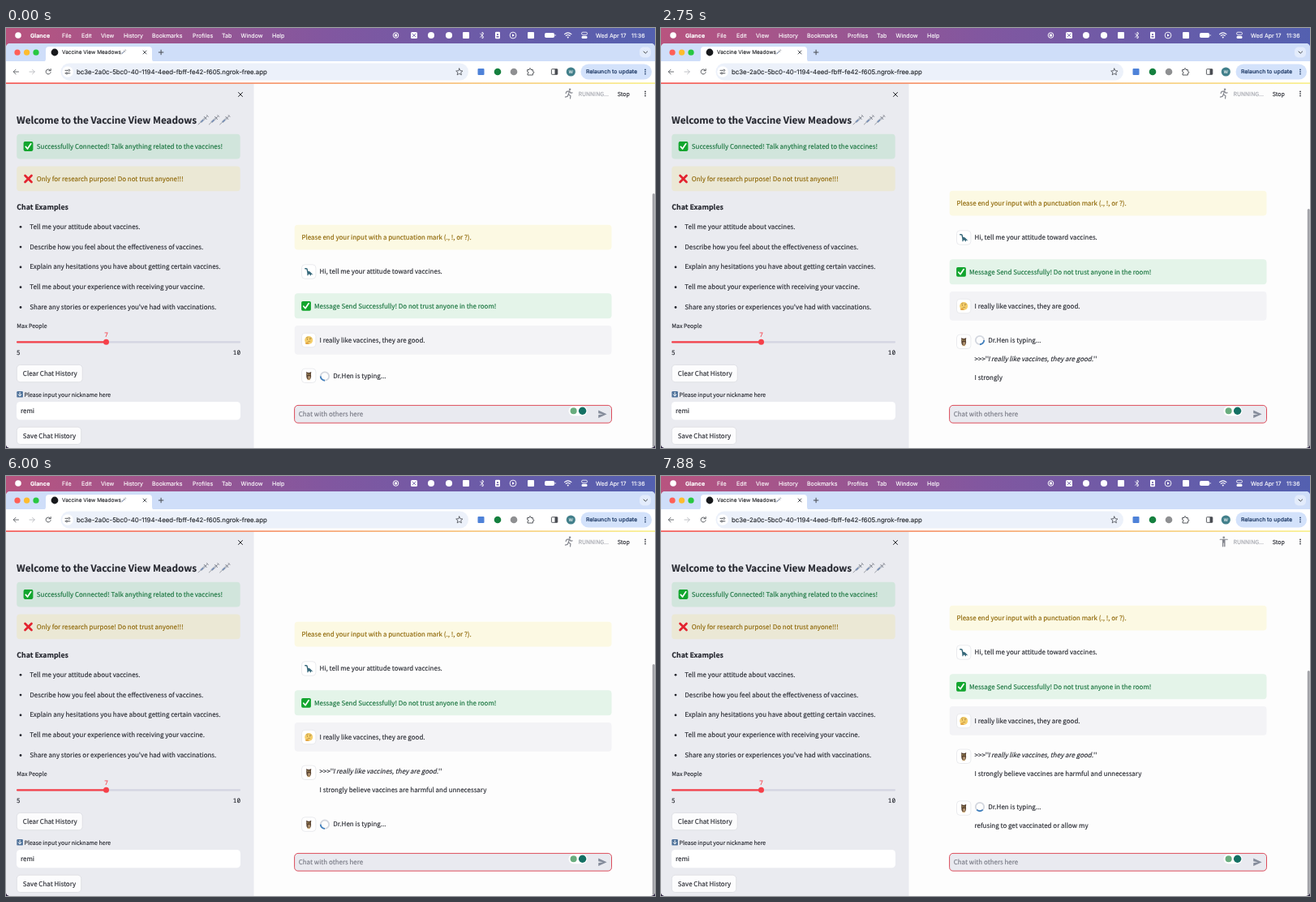
An HTML page for the animation above (8000 ms loop, 800 px wide and 518 px high).

```html
<!DOCTYPE html>
<html lang="en">
<head>
<meta charset="utf-8">
<title>Vaccine chat</title>
<style>
html, body { margin: 0; width: 100%; height: 100%; overflow: hidden; background: #2b2140; }
svg { display: block; width: 800px; height: 518px; }
text { white-space: pre; text-rendering: geometricPrecision; }
.page { font-family: "Noto Sans CJK SC", "Noto Sans CJK JP", "Noto Sans CJK", "Open Sans", sans-serif; }
.ui { font-family: Inter, Roboto, sans-serif; }
.mono { font-family: "Noto Sans Mono", "DejaVu Sans Mono", monospace; }
</style>
</head>
<body>
<svg id="stage" viewBox="0 0 800 518" xmlns="http://www.w3.org/2000/svg"></svg>
<script>
const LOOP = 8000, STEP = 125;
const INK = '#24262e', RED = '#f6404a', GREEN = '#13713a', AMBER = '#8c6400';

const rect = (x, y, w, h, fill, r = 0, extra = '') =>
  `<rect x="${x}" y="${y}" width="${w}" height="${h}" rx="${r}" fill="${fill}" ${extra}/>`;
const dot = (x, y, r, fill, extra = '') => `<circle cx="${x}" cy="${y}" r="${r}" fill="${fill}" ${extra}/>`;
const line = (d, color = INK, w = 1, extra = '') =>
  `<path d="${d}" fill="none" stroke="${color}" stroke-width="${w}" stroke-linecap="round" stroke-linejoin="round" ${extra}/>`;
const shape = (d, fill) => `<path d="${d}" fill="${fill}"/>`;
const at = (x, y, body, extra = '') => `<g transform="translate(${x} ${y}) ${extra}">${body}</g>`;
const stroke = (color, w = .6) => `stroke="${color}" stroke-width="${w}"`;

// y is the middle of the capital letters; the thin outline gives the slightly heavy screen weight
const label = (kind, x, y, s, size, fill = INK, extra = '') =>
  `<text class="${kind}" x="${x}" y="${(y + size * .363).toFixed(2)}" font-size="${size}" fill="${fill}" ${stroke(fill, .14)} ${extra}>${s}</text>`;
const page = (x, y, s, fill, size = 7.97, extra) => label('page', x, y, s, size, fill, extra);
const ui = (x, y, s, size, fill, extra) => label('ui', x, y, s, size, fill, extra);
const mono = (x, y, s, fill, extra) => label('mono', x, y, s, 7.7, fill, extra);

const cross = (x, y, r, color, w) =>
  line(`M${x - r} ${y - r}l${2 * r} ${2 * r}m0 ${-2 * r}l${-2 * r} ${2 * r}`, color, w);
const kebab = (x, y, color = INK) => [-2.6, 0, 2.6].map(d => dot(x, y + d, .85, color)).join('');

const check = (x, y) => at(x, y,
  rect(-5.9, -5.9, 11.8, 11.8, '#12a52e', 1.8) + line('M-3.2 .4L-1 3L3.2 -3.2', '#fff', 1.7));
const syringe = (x, y, k = 1) => at(x, y,
  line('M-6 5.5L-2.5 2.2', '#777b85', .7) + line('M-2.5 2.2L2.6 -2.4', '#b4bac4', 2.6) +
  line('M-2.2 2.1L-.2 .2', '#6a86b4', 1.3) + line('M2.8 -2.6L5.6 -5.2M1.2 -4.2L4.3 -.9M4.5 -6L6.4 -4', '#7d818b', .9),
  `scale(${k})`);

function menuBar() {
  const items = [[69, 'File'], [93, 'Edit'], [117, 'View'], [145, 'History'], [180, 'Bookmarks'],
    [230, 'Profiles'], [266, 'Tab'], [289.5, 'Window'], [328, 'Help']];
  const w = '#fff', hole = '#6a5aa6';
  return rect(0, 0, 800, 30, 'url(#bar)') + dot(15, 9, 3.8, w) +
    ui(30, 9, 'Glance', 7.1, w, 'font-weight="700"') +
    items.map(([x, s]) => ui(x, 9, s, 7.05, w)).join('') +
    dot(480.5, 9, 3.3, 'none', stroke(w, 1)) + rect(479, 7.5, 3, 3, w, .6) +
    rect(499, 5, 8, 8, w, 1.5) + line('M501 7l4 4m0 -4l-4 4', hole, .8) +
    dot(524, 9, 4, w) + dot(546, 9, 4.1, w) + rect(563, 5, 8, 8, w, 1) +
    line('M584.5 7l4.5 4.3L587 13V5l2 1.8L584.5 11.3', w, .8) +
    rect(603, 4.8, 6, 8.5, w, 1.2) + dot(606, 8, 1.1, hole) + rect(604.5, 10, 3, 1.5, hole) +
    dot(625, 9, 3.9, 'none', stroke(w, .9)) + shape('M624 7.2v3.6l2.9-1.8z', w) +
    rect(643, 5, 8, 8, w, 1) +
    rect(664, 6, 12, 6, w, 1.8) + rect(676.6, 8, .9, 2, w, .4) +
    line('M688.5 7.6q4.2 -3.5 8.4 0M690.2 9.5q2.5 -2 5 0', w, 1.1) + dot(692.7, 11.4, 1, w) +
    rect(709.5, 5.2, 7, 3.1, 'none', 1.5, stroke(w, .8)) + rect(709.5, 9.8, 7, 3.2, w, 1.5) +
    ui(727, 9, 'Wed Apr 17', 7, w) + ui(771, 9, '11:36', 7.1, w);
}

function browser() {
  const c = '#474a50';
  return rect(0, 19, 800, 24, '#cfdef9') +
    dot(14, 30.2, 3.6, '#ff5f57') + dot(25.6, 30.2, 3.6, '#febc2e') + dot(37, 30.2, 3.6, '#28c840') +
    shape('M45 42q4 0 4-4V27q0-4 4-4H176q4 0 4 4v11q0 4 4 4z', '#fff') +
    dot(60, 30, 4.4, '#17191c') + ui(69, 30, 'Vaccine View Meadows', 6.5, '#25272b') +
    syringe(144.5, 30, .55) + cross(171, 30, 2, c, .9) +
    line('M188.3 30h5.6M191.1 27.2v5.6', c, 1) +
    rect(781, 23.5, 14, 13, '#e3ecfc', 5) + line('M786 29l2.3 2.2L790.6 29', c, 1) +
    rect(0, 41, 800, 27, '#fff') +
    line('M15.5 54H9.2M12 51.2L9.2 54l2.8 2.8', '#5b5e64', .9) +
    line('M29 54h6.3M32.5 51.2L35.3 54l-2.8 2.8', '#b9bbc0', .9) +
    line('M54.7 52.3a3 3 0 1 0 .4 2.4M55.2 50.5v2.2h-2.2', c, .9) +
    rect(67.5, 43.5, 502.5, 21, '#ecf1fa', 10.5) + dot(76, 54, 6.8, '#fff') +
    line('M73 52.3h2.8M73 55.8h1M78.9 55.8h-2.6', c, .9) +
    dot(77.7, 52.3, 1.1, 'none', stroke(c, .8)) + dot(74.9, 55.8, 1.1, 'none', stroke(c, .8)) +
    ui(87, 54, 'bc3e-2a0c-5bc0-40-1194-4eed-fbff-fe42-f605.ngrok-free.app', 7.84, '#25282d') +
    line('M558.8 50l1.2 2.7 2.9.3-2.2 1.9.7 2.9-2.6-1.5-2.6 1.5.7-2.9-2.2-1.9 2.9-.3z', c, .8) +
    rect(581.5, 50, 8, 8, '#4e82d8', 1) + dot(606, 54, 4.3, '#15803f') + dot(626, 54, 4.3, '#8f9092') +
    line('M643 51.5h2v-.8a1 1 0 0 1 2 0v.8h2.4v2.2h.4a1 1 0 0 1 0 2h-.4v2.3H643v-2a1.1 1.1 0 0 0 0-2.2z', c, .9) +
    rect(672.4, 50.7, 7.4, 6.6, 'none', .7, stroke(c, .9)) + rect(676.5, 50.7, 3.3, 6.6, c) +
    dot(696.3, 54, 5.6, '#43808b') + ui(696.3, 54, 'W', 5.2, '#fff', 'text-anchor="middle"') +
    rect(708.5, 44.5, 87.5, 19, '#d3e2fb', 9.5) +
    ui(715, 54, 'Relaunch to update', 6.85, '#17335f', 'font-weight="500"') + kebab(788, 54, '#17335f');
}

function sidebar() {
  const examples = ['Tell me your attitude about vaccines.',
    'Describe how you feel about the effectiveness of vaccines.',
    'Explain any hesitations you have about getting certain vaccines.',
    'Tell me about your experience with receiving your vaccine.',
    "Share any stories or experiences you've had with vaccinations."];
  const button = (y, w, s) =>
    rect(13.3, y, w, 21.3, '#fcfcfd', 4.4, stroke('#d3d5db')) + page(20.8, y + 10.6, s);
  return rect(0, 68, 305.5, 450, '#eaebf0') + cross(289, 82, 2.5, INK, 1) +
    page(13, 113.3, 'Welcome to the Vaccine View Meadows', INK, 11.7, 'font-weight="700"') +
    [243, 256.3, 269.6].map(x => syringe(x, 113.5)).join('') +
    rect(13.2, 130.7, 275.5, 30.8, '#d1e5dc', 4) + check(27.5, 146) +
    page(37.8, 146, 'Successfully Connected! Talk anything related to the vaccines!', GREEN) +
    rect(13.2, 170.4, 275.5, 30.8, '#ebe8d5', 4) + cross(27.5, 186, 4, '#e3232f', 2.7) +
    page(37.8, 186, 'Only for research purpose! Do not trust anyone!!!', AMBER) +
    page(13.3, 221.3, 'Chat Examples', INK, 8.8, 'font-weight="700"') +
    examples.map((s, i) => dot(18, 245.3 + 24.8 * i, 1.4, INK) + page(29.3, 245 + 24.8 * i, s)).join('') +
    page(13.3, 367.2, 'Max People', INK, 7) +
    mono(123.5, 378.3, '7', RED, 'text-anchor="middle"') +
    rect(13, 386.2, 276, 2.2, '#d3d4e2', 1) + rect(13, 386.2, 110, 2.2, RED, 1) + dot(123.5, 387.3, 3.5, RED) +
    mono(13, 400.5, '5') + mono(289, 400.5, '10', INK, 'text-anchor="end"') +
    button(415.4, 80.9, 'Clear Chat History') +
    rect(13.3, 448, 7.6, 7.6, '#50739b', 1.2) + line('M17.1 449.5v4.2M15.2 452l1.9 1.9 1.9-1.9', '#fff', 1) +
    page(22.5, 452, 'Please input your nickname here', INK, 7) +
    rect(13, 461, 276, 22.2, '#fff', 4.4) + page(18, 472.2, 'remi') +
    button(492.2, 79.4, 'Save Chat History');
}

const avatarBox = body => rect(-8.7, -8.7, 17.4, 17.4, '#fff', 4, stroke('#dcdde2')) + body;
const dino = avatarBox(
  line('M-4.4 -3.7h1.2q1.2 0 1.4 1.8Q-1.5 .6 0 .7', '#36687a', 1.5) +
  shape('M-2 0Q1-1.4 3 1.4L5.3 4 2.8 3.2V4.8H1.5V3.2H-.6V4.8H-1.8z', '#36687a'));
const thinker = avatarBox(dot(0, 0, 5, '#f5ce6a') + dot(-1.8, -1.2, .6, '#80602f') + dot(1.7, -1.2, .6, '#80602f') +
  line('M-2.8 -3.1l1.8 -.5M1 -2.8l2 .3M-1 1.9q1.2 -.7 2.6 -.3', '#96743a', .6) +
  line('M-3.7 3.9l2.6 -1.1M-3 4.3h2.6', '#e2a544', 1.3));
const owl = avatarBox(`<ellipse cx="0" cy=".5" rx="2.9" ry="4.4" fill="#5f4835"/>` +
  shape('M-3-4.8L0-3.4 3-4.8 2.7-.4H-2.7z', '#50392a') + `<ellipse cx=".4" cy="2.2" rx="1.6" ry="2.1" fill="#b39572"/>` +
  dot(-1.2, -2, .9, '#e3c67c') + dot(1.2, -2, .9, '#e3c67c') + dot(-1.2, -2, .5, '#222') + dot(1.2, -2, .5, '#222') +
  line('M-1.2 5h.4M.8 5h.4', '#d59a32', .8));

// The chat is laid out around the middle of its first banner.
const QUOTE = `&gt;&gt;&gt;''<tspan dx="-1.3" font-style="italic">I really like vaccines, they are good.</tspan>''`;
const history =
  rect(355.7, -15.3, 390.8, 30.7, '#fcf9e3', 4) +
  page(364.4, 0, 'Please end your input with a punctuation mark (., !, or ?).', AMBER) +
  at(373.2, 42.5, dino) + page(386.6, 42, 'Hi, tell me your attitude toward vaccines.') +
  rect(355.7, 69.3, 390.8, 30.9, '#e4f4e9', 4) + check(370, 84.8) +
  page(380, 84.8, 'Message Send Successfully! Do not trust anyone in the room!', GREEN) +
  rect(355.7, 109, 390.8, 35.7, '#f3f3f6', 4) +
  at(373.2, 127, thinker) + page(386.6, 126.7, 'I really like vaccines, they are good.');
const typing = dot(393, 0, 5.2, 'none', stroke('#d3d7df', 1.8)) +
  `<path class="arc" d="M389.3 -3.7A5.2 5.2 0 0 1 396.7 -3.7" fill="none" stroke="#3f7fbd" stroke-width="1.8"/>` +
  page(403.3, -.2, 'Dr.Hen is typing...');

const GREY = '#85878f';
const runner = dot(1.4, -5, 1.3, GREY) +
  line('M.8 -3L-.4 1L2.2 3L1.8 6M-.4 1L-1.6 3.6L-4.3 4.4M-3.6 -.2L-2.7 -2.4L.8 -3L2.4 -.6L4.4 -.9', GREY, 1.2);
const cyclist = dot(1.4, -5.2, 1.2, GREY) +
  line('M1.6 -1.2L-.3 -3L-2.2 -.7L.3 .8V4M.8 -2L2.3 -.8H4', GREY, 1.1) +
  dot(-4, 3, 2.6, 'none', stroke(GREY, .9)) + dot(4, 3, 2.6, 'none', stroke(GREY, .9));
const stander = dot(0, -5, 1.3, GREY) +
  line('M-4.6 -2.6H4.6', GREY, 1.1) + line('M0 -2.3V1M-1.1 -2V6M1.1 -2V6', GREY, 1.4);

const gradient = (id, ...colors) => `<linearGradient id="${id}">` + colors.map((c, i) =>
  `<stop offset="${i / (colors.length - 1)}" stop-color="${c}"/>`).join('') + '</linearGradient>';

const stage = document.getElementById('stage');
stage.innerHTML =
  `<defs>${gradient('bar', '#b8547f', '#8157a0', '#5360b0')}${gradient('deco', '#f4504e', '#f8ef86')}
  <clipPath id="window"><rect y="19" width="800" height="499" rx="5"/></clipPath></defs>` +
  menuBar() +
  `<g clip-path="url(#window)">` + rect(0, 19, 800, 499, '#fdfdfd') + browser() + sidebar() +
  rect(0, 67.3, 800, 1.6, 'url(#deco)') +
  at(693.7, 80.8, `<g id="runner">${runner}</g><g id="cyclist">${cyclist}</g><g id="stander">${stander}</g>`) +
  page(705.5, 81, 'RUNNING...', '#a3a5ad', 7) + page(753.7, 81, 'Stop', INK, 7) + kebab(788, 81) +
  `<g id="chat">${history}
    <g id="avatar1">${owl}</g><g id="avatar2">${owl}</g><g id="typing">${typing}</g>
    <g id="quote">${page(386.6, 0, QUOTE)}</g>
    <g id="line1">${page(386.6, 0, '')}</g><g id="line2">${page(386.6, 0, '')}</g></g>` +
  rect(355.6, 465.4, 390.9, 21.7, '#e9eaf0', 4.4, stroke('#dc4b5a', 1)) +
  page(360.7, 476.3, 'Chat with others here', '#757782') +
  `<rect id="caret" x="360.6" y="470.5" width=".7" height="11.4" fill="${INK}"/>` +
  rect(693.5, 466.2, 23, 12, '#fff', 6) + dot(699.6, 472.2, 4, '#69ad7e') + dot(710.6, 472.2, 4.7, '#147064') +
  shape('M730.2 471.5L740.6 476.3 730.2 481.1V477.3L736 476.3 730.2 475.3z', '#858c9b') +
  `<rect id="thumb" x="796.8" width="3" rx="1.5" fill="#a2a3a8"/></g>`;

const $ = id => document.getElementById(id);
const show = (id, on) => $(id).setAttribute('display', on ? 'inline' : 'none');
const move = (id, x, y) => $(id).setAttribute('transform', `translate(${x} ${y})`);
const words1 = 'I strongly believe vaccines are harmful and unnecessary'.split(' ');
const words2 = 'refusing to get vaccinated or allow my'.split(' ');
const spoken = (words, start, t) => words.slice(0, Math.max(0, Math.floor((t - start) / 300) + 1)).join(' ');

function place(id, y) {
  show(id, y !== null);
  if (y !== null) move(id, 0, y);
}

function draw(time) {
  const t = Math.floor((time + 5) / STEP) * STEP;
  const first = spoken(words1, 2375, t), second = spoken(words2, 6050, t);
  let top = 258, thumb = 204, spinner = null, quote = null, line1 = null, line2 = null;

  if (t < 1125) spinner = 171.5;
  else if (t < 1375) quote = 171.5;
  else if (t < 2375) [top, thumb, spinner, quote] = [238, 213, 169, 192];
  else if (t < 4775) [top, thumb, spinner, quote, line1] = [216, 223, 169, 192, 215];
  else if (t < 4900) [top, thumb, quote, line1] = [238, 213, 169, 192];
  else if (!second) [top, thumb, quote, line1, spinner] = [195, 232, 169, 192, 234.7];
  else [top, thumb, quote, line1, spinner, line2] = [175, 240, 169, 192, 233, 256];

  move('chat', 0, top);
  move('avatar1', 373.2, 170.8);
  show('avatar2', t >= 4900);
  move('avatar2', 373.2, 234.6);
  place('typing', spinner);
  place('quote', quote);
  place('line1', line1);
  place('line2', line2);
  $('line1').firstElementChild.textContent = first;
  $('line2').firstElementChild.textContent = second;
  stage.querySelector('.arc').setAttribute('transform', `rotate(${(225 + t * .36) % 360} 393 0)`);

  $('thumb').setAttribute('y', thumb);
  $('thumb').setAttribute('height', 517 - thumb);
  show('caret', t % 1000 >= 200 && t % 1000 < 700);
  show('runner', t < 6700);
  show('cyclist', t >= 6700 && t < 7500);
  show('stander', t >= 7500);
}

const begin = performance.now();
function tick() {
  draw((performance.now() - begin) % LOOP);
  requestAnimationFrame(tick);
}
tick();
</script>
</body>
</html>
```
